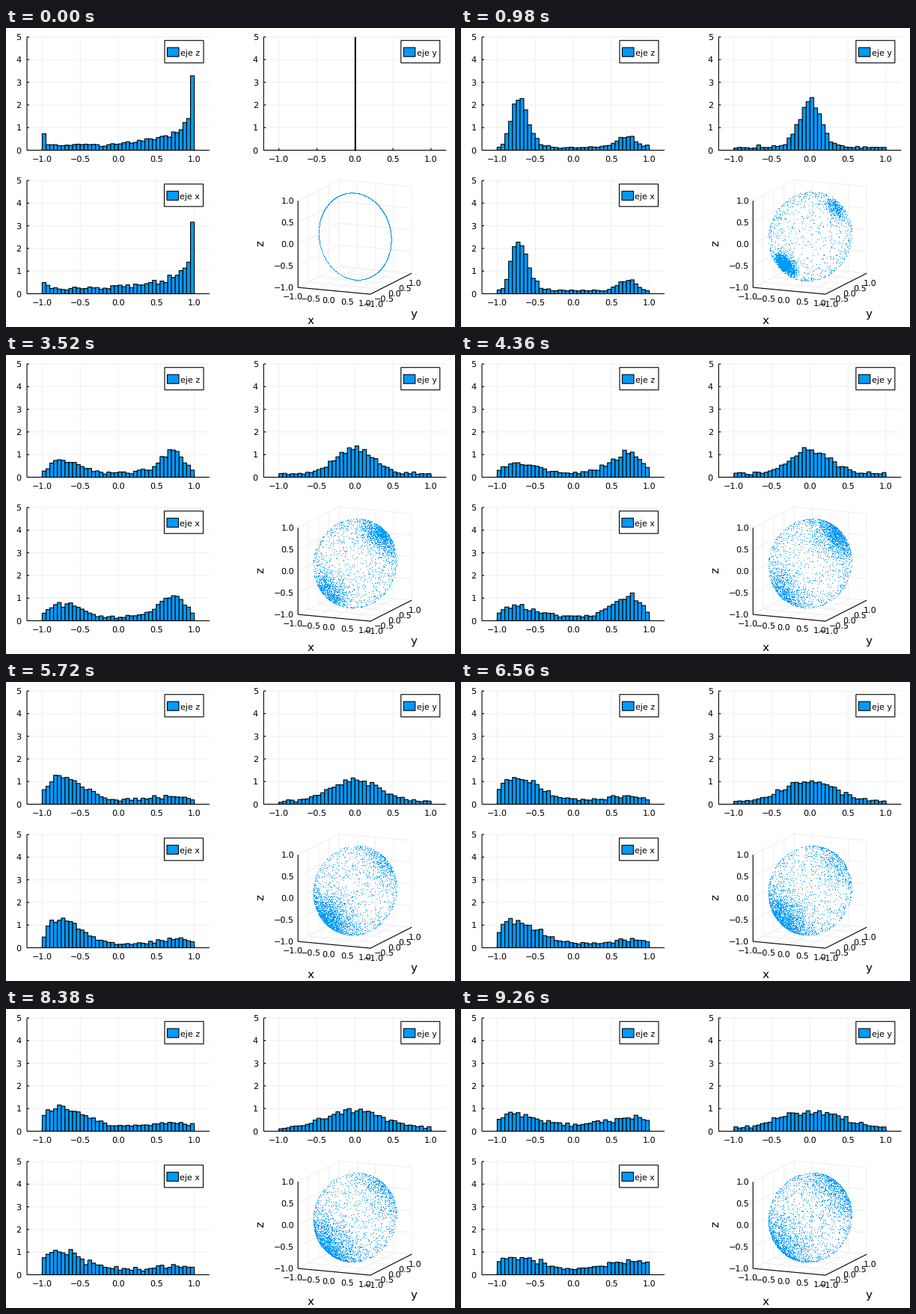
A matplotlib script for the animation above (9.28 s loop, 600 px wide and 400 px high).

```python
import numpy as np
import matplotlib.pyplot as plt
from matplotlib.animation import FuncAnimation
from matplotlib.collections import LineCollection, PolyCollection
from matplotlib.patches import Rectangle

W, H, DPI = 600, 400, 100
PX = 72 / DPI
BLUE, GRID = "#009afa", "#f0f0f0"
STEPS, N = 200, 3000
TICK, UNIT, RISE = 8, 101.6, 30.3
HALVES = (-1, -0.5, 0, 0.5, 1)

plt.rcParams.update({"font.family": "DejaVu Sans", "text.hinting": "none",
                     "path.snap": False})
fig = plt.figure(figsize=(W / DPI, H / DPI), dpi=DPI, facecolor="white")
ax = fig.add_axes([0, 0, 1, 1])
ax.set_xlim(0, W)
ax.set_ylim(H, 0)
ax.axis("off")


# ---- spins diffusing on a sphere, driven back and forth along (1, 0, 1) ----

def tilt_density(t, a):
    """Density of the angle to the easy axis at step t."""
    start = np.exp(-t / 6)
    early = np.exp(-t / 3)
    swing = np.sin(np.radians(20.3 * t - 96)) * (1 - (t / 250) ** 1.9)
    m = 0.5 * early + (1 - early) * swing
    loose = min(0.32 * (1 - 0.75 * m * m), 1 - abs(m))
    up, down = (1 - loose + m) / 2, (1 - loose - m) / 2
    spread = 0.0009 * t / (1 + t / 1000) + 0.1 * start

    def unit(f):
        return f / f.sum()

    lobe = unit(np.sin(a) * np.exp((np.cos(a) - 1) / spread))
    ring = unit(np.exp(1.19 * np.cos(a)))
    cloud = up * lobe + down * lobe[::-1] + loose * unit(np.sin(a))
    return start * ring + (1 - start) * cloud


def simulate():
    rng = np.random.default_rng(12)
    a = np.linspace(0, np.pi, 1500)
    rank = rng.random(N)
    turn = np.pi * rng.integers(0, 2, N)
    states = []
    for t in range(STEPS):
        cdf = np.cumsum(tilt_density(t, a))
        q = 1 - np.abs(rank % 2 - 1)
        tilt = np.interp(q, cdf / cdf[-1], a)
        along, across = np.cos(tilt), np.sin(tilt) * np.cos(turn)
        side = np.sin(tilt) * np.sin(turn)
        if t == 0:
            side = np.zeros(N)
        r = np.sqrt(0.5)
        states.append((r * (along - across), side, r * (along + across)))
        rank = rank + rng.normal(0, 0.03, N)
        turn = turn + rng.normal(0, min(0.05 + 0.03 * t, 0.3), N)
    return states


def bin_edges(v):
    lo, hi = v.min(), v.max()
    if hi - lo < 1e-6:
        return np.array([-0.004, 0.004])
    raw = (hi - lo) / 40
    base = 10 ** np.floor(np.log10(raw))
    width = base * next(k for k in (1, 2, 5, 10) if raw <= k * base * 1.0001)
    first, last = np.floor(lo / width), np.ceil(hi / width)
    return np.arange(first, last + 1) * width


# ---- drawing helpers ----

def lines(segs, color, width=1.1, z=1):
    ax.add_collection(LineCollection(segs, colors=color, linewidths=width * PX,
                                     zorder=z), autolim=False)


def text(x, y, s, size=TICK, **kw):
    kw = {"ha": "center", "va": "baseline", "zorder": 6, **kw}
    ax.text(x, y, s, fontsize=size, color="black", **kw)


def num(v):
    return f"{v:.1f}".replace("-", "\u2212")


def box(x, y, w, h, fill, z):
    ax.add_patch(Rectangle((x, y), w, h, facecolor=fill, edgecolor="black",
                           linewidth=1.1 * PX, zorder=z))


class Hist:
    def __init__(self, left, top, name, key_x, key_y):
        self.mid, self.base = left + 122, top + 5 * RISE
        right = left + 244
        xs = [self.mid + UNIT * v for v in HALVES]
        ys = [self.base - RISE * k for k in range(6)]
        lines([[(x, top), (x, self.base)] for x in xs]
              + [[(left, y), (right, y)] for y in ys], GRID)
        lines([[(left, top), (left, self.base)],
               [(left, self.base), (right, self.base)]]
              + [[(x, self.base), (x, self.base - 3)] for x in xs]
              + [[(left, y), (left + 3, y)] for y in ys], "black", z=4)
        for v, x in zip(HALVES, xs):
            text(x, self.base + 15.5, num(v))
        for k, y in enumerate(ys):
            text(left - 7.5, y + 4, str(k), ha="right")

        self.bars = PolyCollection([], facecolors=BLUE, edgecolors="black",
                                   linewidths=1.1 * PX, zorder=3)
        ax.add_collection(self.bars, autolim=False)
        self.bars.set_clip_path(Rectangle((left, top - 0.5), 244, 5 * RISE + 1.5,
                                          transform=ax.transData))

        box(key_x, key_y, 52, 30, "white", 5)
        box(key_x + 3.5, key_y + 9.5, 15.5, 12, BLUE, 5.5)
        text(key_x + 21, key_y + 20, name, ha="left")

    def update(self, v):
        edges = bin_edges(v)
        dens = np.histogram(v, edges)[0] / (len(v) * np.diff(edges))
        x = self.mid + UNIT * edges
        y = self.base - RISE * np.minimum(dens, 6)
        b = self.base
        self.bars.set_verts([[(l, b), (l, t), (r, t), (r, b)]
                             for l, r, t in zip(x[:-1], x[1:], y) if t < b])


def project(x, y, z):
    return 466.2 + 48.4 * x + 27.6 * y, 279.6 + 4.5 * x - 14 * y - 58 * z


def draw_cube():
    grid = []
    for v in HALVES:
        for path in ([(v, -1, -1), (v, 1, -1), (v, 1, 1)],
                     [(1, v, -1), (-1, v, -1), (-1, v, 1)],
                     [(-1, -1, v), (-1, 1, v), (1, 1, v)]):
            grid.append([project(*p) for p in path])
    lines(grid, GRID)
    lines([[project(-1, -1, 1), project(-1, -1, -1), project(1, -1, -1),
            project(1, 1, -1)]], "black", z=4)

    for v in HALVES:
        x, y = project(v, -1, -1)
        text(x - 7, y + 16, num(v))
        x, y = project(1, v, -1)
        text(x + 4.5, y + 17, num(v))
        x, y = project(-1, -1, v)
        text(x - 5, y + 4, num(v), ha="right")
    text(407.5, 396, "x", 11)
    text(545, 387, "y", 11)
    text(340.5, 288.5, "z", 11, va="center", rotation=90)


states = simulate()
hist_z = Hist(28, 12, "eje z", 212, 16.7)
hist_y = Hist(344.3, 12, "eje y", 527.8, 16.7)
hist_x = Hist(28, 204, "eje x", 211.5, 208.8)
draw_cube()
dots, = ax.plot([], [], ",", color=BLUE, zorder=3)


def step_at(ms):
    """Steps last 20, 100 and 20 ms in turn."""
    group, rest = divmod(ms, 140)
    return min(3 * group + (rest >= 20) + (rest >= 120), STEPS - 1)


def draw(i):
    x, y, z = states[step_at(20 * i)]
    hist_x.update(x)
    hist_y.update(y)
    hist_z.update(z)
    dots.set_data(*project(x, y, z))
    return hist_x.bars, hist_y.bars, hist_z.bars, dots


anim = FuncAnimation(fig, draw, frames=464, interval=20, repeat=True,
                     repeat_delay=0, blit=False)
plt.show()
```
